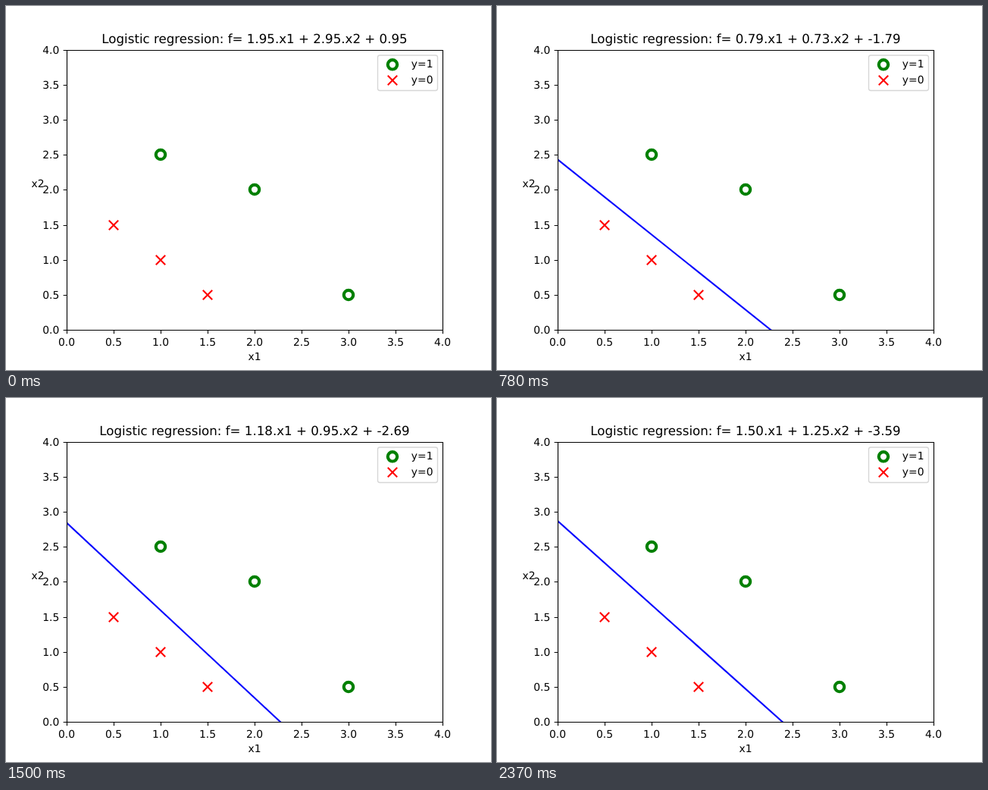
An HTML page for the animation above (5.7 s loop, 640x480 px).

```html
<!DOCTYPE html>
<html lang="en">
<head>
<meta charset="utf-8">
<title>Logistic regression</title>
<style>
  html, body { margin: 0; width: 100%; height: 100%; overflow: hidden; background: #fff; }
  svg { display: block; }
  text { font-family: "DejaVu Sans", sans-serif; font-size: 13.889px; text-rendering: geometricPrecision; }
  #title { font-size: 16.667px; }
  .mid { text-anchor: middle; }
  .end { text-anchor: end; }
  .axis { fill: none; stroke: #000; stroke-width: 1.11; }
  .ring { fill: none; stroke: #008000; stroke-width: 4.17; }
  .cross { fill: none; stroke: #f00; stroke-width: 2.08; }
  #boundary { stroke: #00f; stroke-width: 2.08; }
  #legend rect { fill: #fff; fill-opacity: .8; stroke: #ccc; stroke-opacity: .8; stroke-width: 1.39; }
</style>
</head>
<body>
<svg id="stage" width="640" height="480" viewBox="0 0 640 480">
  <clipPath id="plot"><rect x="80" y="57.6" width="496" height="369.6"/></clipPath>
  <g id="points"></g>
  <g clip-path="url(#plot)"><line id="boundary"/></g>
  <g id="axes"><path class="axis" d="M80.5 58.5H576.5V427.5H80.5Z"/></g>
  <text class="mid" x="328" y="467">x1</text>
  <text class="mid" x="42" y="239">x2</text>
  <text class="mid" id="title" x="328" y="49"></text>
  <g id="legend">
    <rect x="490.5" y="65" width="79" height="46.5" rx="2.8"/>
    <text x="534.8" y="81">y=1</text>
    <text x="534.8" y="102">y=0</text>
  </g>
</svg>
<script>
const LOOP = 5700, FRAME = 30, FRAMES = 80, STEPS_PER_FRAME = 5, RATE = 0.1;
const samples = [
  [1, 2.5, 1], [2, 2, 1], [3, 0.5, 1],
  [0.5, 1.5, 0], [1, 1, 0], [1.5, 0.5, 0]
];

const byId = id => document.getElementById(id);
const px = x => 80 + 124 * x;
const py = y => 427.2 - 92.4 * y;

function add(parent, tag, attrs, text = "") {
  const node = document.createElementNS("http://www.w3.org/2000/svg", tag);
  for (const key in attrs) node.setAttribute(key, attrs[key]);
  node.textContent = text;
  byId(parent).appendChild(node);
}

function marker(parent, x, y, label) {
  const r = 6.21;
  if (label) add(parent, "circle", { class: "ring", cx: x, cy: y, r });
  else add(parent, "path", {
    class: "cross",
    d: `M${x - r} ${y - r}l${2 * r} ${2 * r}M${x - r} ${y + r}l${2 * r} ${-2 * r}`
  });
}

function drawAxes() {
  for (let v = 0; v <= 4; v += 0.5) {
    const x = Math.round(px(v)) + 0.5, y = Math.round(py(v)) + 0.5;
    add("axes", "path", { class: "axis", d: `M${x} 427.5v4.86M80.5 ${y}h-4.86` });
    add("axes", "text", { class: "mid", x: px(v), y: 448 }, v.toFixed(1));
    add("axes", "text", { class: "end", x: 70.3, y: Math.round(py(v) + 5.1) }, v.toFixed(1));
  }
}

// Batch gradient descent on the mean log loss.
function descend([a, b, c]) {
  let da = 0, db = 0, dc = 0;
  for (const [x1, x2, label] of samples) {
    const error = 1 / (1 + Math.exp(-(a * x1 + b * x2 + c))) - label;
    da += error * x1;
    db += error * x2;
    dc += error;
  }
  const k = RATE / samples.length;
  return [a - k * da, b - k * db, c - k * dc];
}

function train() {
  const history = [];
  let weights = [2, 3, 1];
  for (let step = 0; step < FRAMES * STEPS_PER_FRAME; step++) {
    weights = descend(weights);
    if (step % STEPS_PER_FRAME === 0) history.push(weights);
  }
  return history;
}

drawAxes();
for (const [x, y, label] of samples) marker("points", Math.round(px(x)), Math.round(py(y)), label);
marker("legend", 510, 77.3, 1);
marker("legend", 510, 98, 0);

const history = train();
const title = byId("title"), boundary = byId("boundary");
let shown = -1;

function show(index) {
  if (index === shown) return;
  shown = index;
  const [a, b, c] = history[index];
  const edge = x => py(-(a * x + c) / b);
  title.textContent =
    `Logistic regression: f= ${a.toFixed(2)}.x1 + ${b.toFixed(2)}.x2 + ${c.toFixed(2)}`;
  const ends = { x1: px(0), y1: edge(0), x2: px(4), y2: edge(4) };
  for (const key in ends) boundary.setAttribute(key, ends[key]);
}

const start = performance.now();
function tick() {
  const time = (performance.now() - start) % LOOP;
  show(Math.min(FRAMES - 1, Math.floor(time / FRAME)));
  requestAnimationFrame(tick);
}
show(0);
requestAnimationFrame(tick);
</script>
</body>
</html>
```
